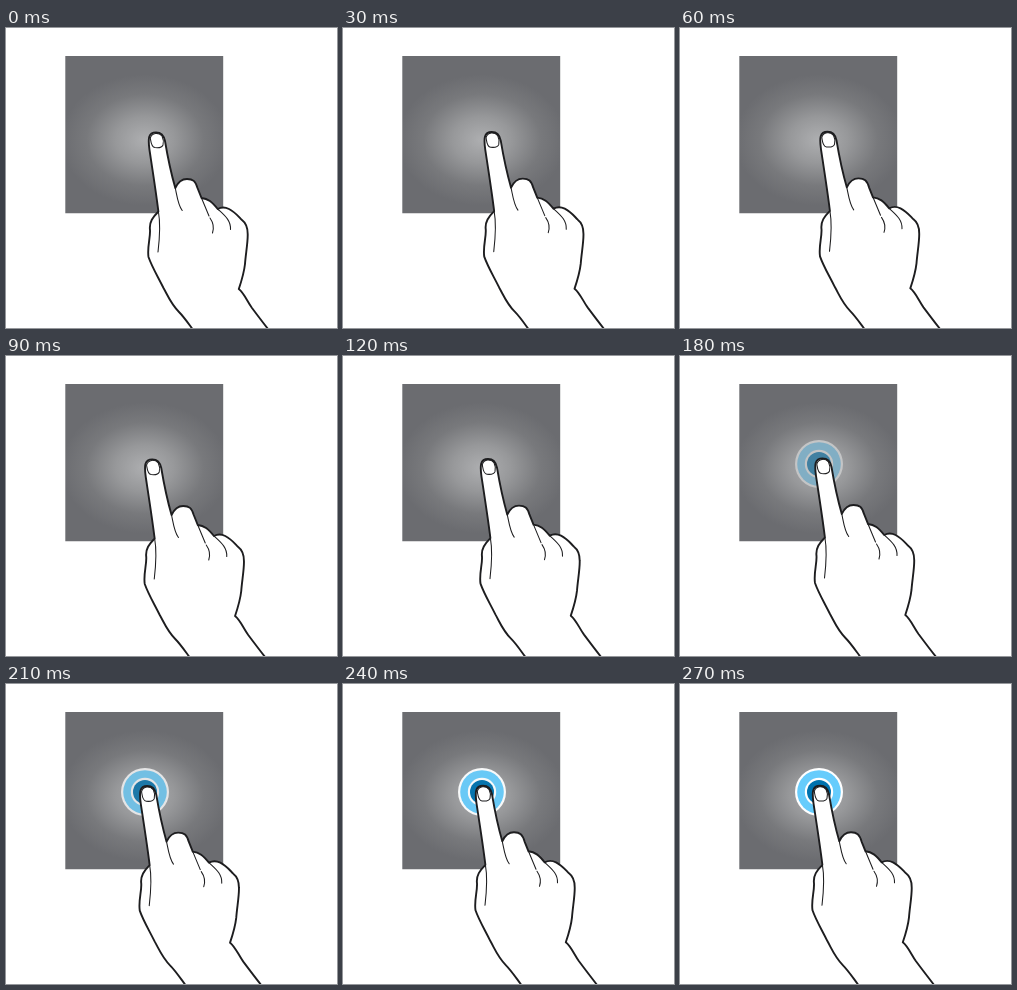
An HTML page with a canvas that plays this animation: 331x300 px, repeating every 0.97 s.

```html
<!DOCTYPE html>
<html lang="en">
<head>
<meta charset="utf-8">
<title>Tap gesture</title>
<style>
  html, body { margin: 0; width: 331px; height: 300px; overflow: hidden; background: #fff; }
  canvas { display: block; }
</style>
</head>
<body>
<canvas id="stage" width="331" height="300"></canvas>
<script>
const ctx = document.getElementById('stage').getContext('2d');
const LOOP = 970, STEP = 30, LAST_STEP = 9, MOVE_STEPS = 8;
const INK = '#1d1d1f';

const outline = new Path2D(`
  M187.7 302.7 C182 295 178 289 173 284 C165 276 162 268 157.5 260
  C151 247 146 239 142.5 229 C141 219 144.5 210 144 202
  C143 194 147 189 152.4 183.5
  C150 164 147 145 143.5 122 C142 111 142 104.4 150 104.4
  C156 104.4 158 108 159 113 C161.5 128 165 145 169.3 160
  C172.5 153 176 151 181 151 C187 151 189.5 153 191.5 160 L195.5 170
  C202 170.5 206 174 211.7 181
  C216 178.7 219 179 223 181 C229 184 232 188 236 192
  C240 195 241.7 199 241.7 206 C242 214 239.7 226 239 236
  C238 245 235.5 253 232.8 261
  C238 265 241 273 246 280 C252 288 258 296 263.4 302.7`);

const creases = new Path2D(`
  M169.3 160 C171 168 172 177 176.2 182.5
  M195.5 170 L203 188
  M204 190 C207.5 195 208.5 199 206.5 205
  M211.7 181 C218 187 225 192 224.5 201.5
  M152.4 183.5 C154.5 195 154 207 152 224`);

const nail = new Path2D(`
  M144.3 110 C145 114 145 119 149 119.6 C153 120 156 120 157 117
  C157.8 114 157.5 111 156 108 C152.5 104 146 104.5 144.3 110 Z`);

const glow = ctx.createRadialGradient(0, 0, 0, 0, 0, 84);
glow.addColorStop(0, '#aeafb1');
glow.addColorStop(0.35, '#97989a');
glow.addColorStop(0.7, '#78797c');
glow.addColorStop(1, '#6b6c70');

function drawPanel() {
  ctx.save();
  ctx.beginPath();
  ctx.rect(59.3, 28, 157.9, 157.2);
  ctx.clip();
  ctx.translate(139, 112);
  ctx.scale(1, 0.78);
  ctx.fillStyle = glow;
  ctx.fillRect(-100, -120, 200, 240);
  ctx.restore();
}

function disc(radius, from, to, opacity) {
  const mixed = from.map((v, i) => Math.round(v + (to[i] - v) * opacity));
  ctx.fillStyle = `rgb(${mixed})`;
  ctx.beginPath();
  ctx.arc(139, 108, radius, 0, Math.PI * 2);
  ctx.fill();
}

function drawRipple(opacity) {
  const gray = [150, 151, 153], white = [255, 255, 255];
  disc(24, gray, white, opacity);
  disc(21.8, gray, [102, 204, 252], opacity);
  disc(14.2, gray, white, opacity);
  disc(12, [115, 138, 150], [0, 114, 174], opacity);
}

function drawHand(progress) {
  ctx.save();
  ctx.translate(-10 * progress, -2.7 * progress);
  ctx.lineJoin = ctx.lineCap = 'round';
  ctx.strokeStyle = INK;
  ctx.fillStyle = '#fff';
  ctx.fill(outline);
  ctx.lineWidth = 1.9;
  ctx.stroke(outline);
  ctx.lineWidth = 1.05;
  ctx.stroke(creases);
  ctx.stroke(nail);
  ctx.restore();
}

function draw(time) {
  const step = Math.min(LAST_STEP, Math.floor((time % LOOP) / STEP));
  ctx.fillStyle = '#fff';
  ctx.fillRect(0, 0, 331, 300);
  drawPanel();
  const fade = Math.max(0, (step - 5) / 4);
  if (fade > 0) drawRipple(1 - (1 - fade) ** 2);
  drawHand(Math.min(1, step / MOVE_STEPS));
}

const start = performance.now();
function tick() {
  draw(performance.now() - start);
  requestAnimationFrame(tick);
}
tick();
</script>
</body>
</html>
```
